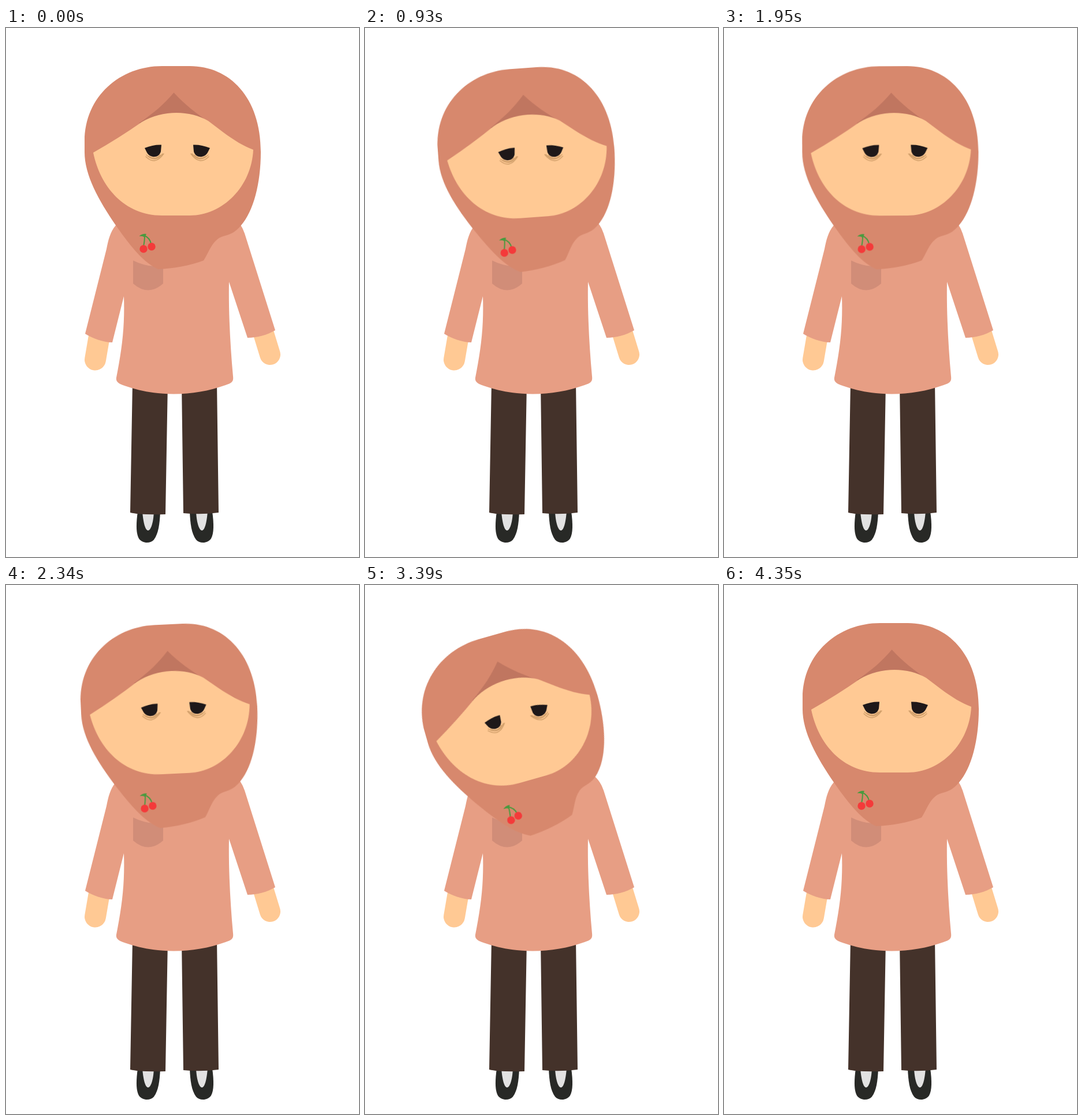
An HTML page that plays this animation: 611 by 917 pixels, repeating every 4500 ms.

```html
<!DOCTYPE html>
<html lang="en">
<head>
<meta charset="utf-8">
<title>Tilting head</title>
<style>
  html, body { margin: 0; width: 100%; height: 100%; overflow: hidden; background: #fff; }
  svg { display: block; width: 611px; height: 917px; }
  .skin { fill: #ffc994; }
  .hand { stroke: #ffc994; stroke-linecap: round; }
  .shirt { fill: #e79e84; }
  .pocket { fill: #d18d78; }
  .trousers { fill: #44322a; }
  .shoe { fill: #282926; }
  .sock { fill: #e2e2e2; }
  .scarf { fill: #d7886d; }
  .fold { fill: #c07660; }
  .eye { fill: #1e1819; }
  .bag { fill: none; stroke: #d2a06b; stroke-width: 1.5; stroke-linecap: round; }
  .cherry { fill: #f43a3a; }
  .stem { fill: none; stroke: #4a9a3f; stroke-width: 2; stroke-linecap: round; }
  .leaf { fill: #4a9a3f; }

  /* Two slow nods to the side, each with a quick return */
  #head {
    transform-origin: 334px 342px;
    animation: nod 4500ms cubic-bezier(.37, 0, .63, 1) infinite;
  }
  @keyframes nod {
    0%, 6.667% { transform: rotate(0deg); }
    33.333% { transform: rotate(-7.7deg); }
    39.556% { transform: rotate(0deg); }
    90.889% { transform: rotate(-20deg); }
    96.667%, 100% { transform: rotate(0deg); }
  }
</style>
</head>
<body>
<svg viewBox="0 0 611 917" xmlns="http://www.w3.org/2000/svg">
  <defs>
    <g id="foot">
      <path class="shoe" d="M228 838C225 860 225 876 230 885C236 894 250 894 256 887C264 876 266 860 267 838Z"/>
      <path class="sock" d="M236 838C238 862 242 871 246 871C250 871 255 860 256 838Z"/>
    </g>
    <g id="eye">
      <path class="eye" d="M240 208C250 204 260 202 269 202.500L268 214C265 226 250 226 244 216Z"/>
      <path class="bag" d="M242 223Q258 239 273 218M243 220Q258 235 271 218M247 222Q258 230 267 220"/>
    </g>
  </defs>

  <use href="#foot"/>
  <use href="#foot" transform="translate(585 0) scale(-1 1)"/>
  <path class="trousers" d="M219 615L215 840Q230 844 276 843L280 615ZM304 615L307 841Q338 844 368 840L365 615Z"/>

  <path class="hand" stroke-width="37" d="M161 537L154.500 575"/>
  <path class="hand" stroke-width="36" d="M446 530L457 566"/>
  <path class="shirt" d="M190 342C180 354 177 368 174 383L137 530C150 538 168 545 184 545L204 465
    C206 520 200 560 191 606C190 613 194 616 205 620C260 640 325 639 380 619C391 615 394 613 393 604
    C388 550 385 490 386 440L418 537C435 537 452 532 466 524L413 356C408 342 402 333 385 322H215Z"/>
  <path class="pocket" d="M220 403Q246 416 272 412V443Q246 466 220 443Z"/>

  <g id="head">
    <path class="scarf" d="M136 197C136 118 198 66 270 66H318C387 66 441 120 441 215C441 270 428 318 407 342
      C396 355 388 358 376 361C357 366 350 392 342 403C318 412 290 417 263 418
      C240 407 220 385 190 342C160 298 136 255 136 215Z"/>
    <path class="fold" d="M290.500 112C274 132 255 148 230 165H353C330 148 308 132 290.500 112Z"/>
    <path class="skin" d="M151 216Q195 191 235 163C270 142 318 142 350 161L375 180C395 195 412 205 428 211
      C425 275 375 325 318 325H270C205 325 163 275 151 216Z"/>
    <use href="#eye"/>
    <use href="#eye" transform="translate(593 0) scale(-1 1)"/>
    <path class="stem" d="M240 359Q240 370 238 378M240 360Q249 364 251 374"/>
    <path class="leaf" d="M230.500 361Q236 356 243 357L240 363Q236 360 230.500 361Z"/>
    <circle class="cherry" cx="238" cy="383" r="6.700"/>
    <circle class="cherry" cx="252" cy="379" r="6.700"/>
  </g>
</svg>
</body>
</html>
```
